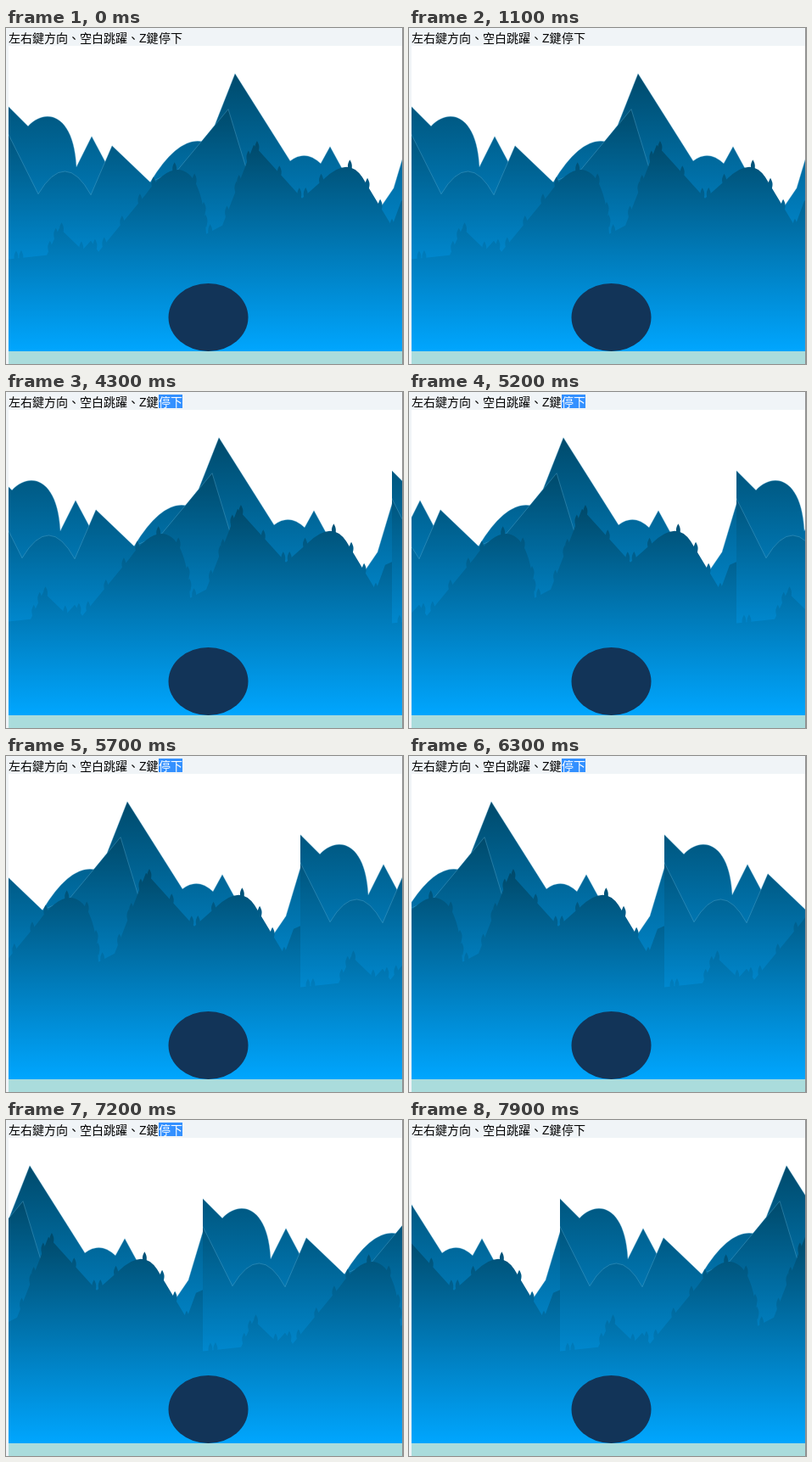
Recreate the animation shown at these times as an HTML page. Size 468x396 px, loop 8 s.

```html
<!DOCTYPE html>
<html lang="zh-Hant">
<head>
<meta charset="utf-8">
<style>
html, body { margin: 0; width: 100%; height: 100%; overflow: hidden; background: #f0f4f7; }
svg { display: block; }
text { font: 300 14px "Liberation Sans", "Noto Sans CJK TC", "Noto Sans CJK", sans-serif; }
.ridge { stroke: #69b4d8; stroke-opacity: .5; stroke-width: .7; }
</style>
</head>
<body>
<svg width="468" height="396" viewBox="0 0 468 396">
  <defs>
    <linearGradient id="blue" gradientUnits="userSpaceOnUse" x1="0" x2="0">
      <stop stop-color="#004a6b"/><stop offset="1" stop-color="#00a5fd"/>
    </linearGradient>
    <linearGradient id="back" href="#blue" y1="53" y2="350"/>
    <linearGradient id="mid" href="#blue" y1="95" y2="355"/>
    <linearGradient id="front" href="#blue" y1="137" y2="378"/>
  </defs>
  <text x="3" y="17">左右鍵方向、空白跳躍、Z鍵</text>
  <rect id="mark" x="180" y="3" width="28" height="16" fill="#3390ff"/>
  <text id="stop" x="180" y="17">停下</text>
  <svg x="3" y="21" width="464" height="375" viewBox="3 21 464 375">
    <rect x="3" y="21" width="464" height="375" fill="#fff"/>
    <g id="scene">
      <!-- ridges run past the tile edges so their outlines leave no seam -->
      <svg id="tile" x="3" y=".7" width="471" height="396" viewBox="3 0 471 396">
        <path class="ridge" fill="url(#back)" d="M2 91L26 115C48 92 80 102 83 163L101 127 126 174 170 181Q202 128 231 133L246 114 270 53 335 156Q353 142 371 159L382 139 400 172 442 210 457 188 475 128V390H2Z"/>
        <path class="ridge" fill="url(#mid)" d="M2 123L38 195Q70 141 100 196L125 138 170 181 202 167 262 95 300 220V390H2Z"/>
        <g id="woods" fill="url(#front)">
          <path id="hills" d="M2 272L48 267 63 235 90 261 100 250 109 263 165 195C200 145 232 160 236 242L255 232 292 137 349 200 375 177Q403 150 420 175L455 233 466 203 475 199V390H2Z"/>
        </g>
      </svg>
      <use href="#tile" x="471"/>
    </g>
    <rect x="3" y="381" width="464" height="15" fill="#aadcdc"/>
    <ellipse cx="238.5" cy="341" rx="47" ry="40" fill="#123458"/>
  </svg>
  <path d="M467.5 0V396" stroke="#8f8f8f"/>
</svg>
<script>
const byId = id => document.getElementById(id);

let seed = 7;
const random = () => (seed = seed * 16807 % 2147483647) / 2147483647;

// Scatter small trees along the front ridge
function plantTrees() {
  const hills = byId('hills');
  let trees = '', p;
  for (let d = 10; (p = hills.getPointAtLength(d)).x < 472; d += 6 + 36 * random()) {
    trees += `<path d="M${p.x} ${p.y - 9}q3 5 2.4 9l-1 6h-2.8l-1-6q-.6-4 2.4-9"/>`;
  }
  byId('woods').insertAdjacentHTML('beforeend', trees);
}

const LOOP = 8000, STEP = 100, SPEED = 0.077, START = 4053;

function draw(now) {
  const t = Math.floor(now % LOOP / STEP) * STEP;
  const shift = Math.round(Math.max(0, t - START) * SPEED);
  const selected = t >= 3500 && t < 7400;
  byId('scene').setAttribute('transform', `translate(${-shift})`);
  byId('mark').style.display = selected ? '' : 'none';
  byId('stop').style.fill = selected ? '#fff' : '#000';
}

plantTrees();
const begin = performance.now();
function frame() {
  draw(performance.now() - begin);
  requestAnimationFrame(frame);
}
frame();
</script>
</body>
</html>
```
